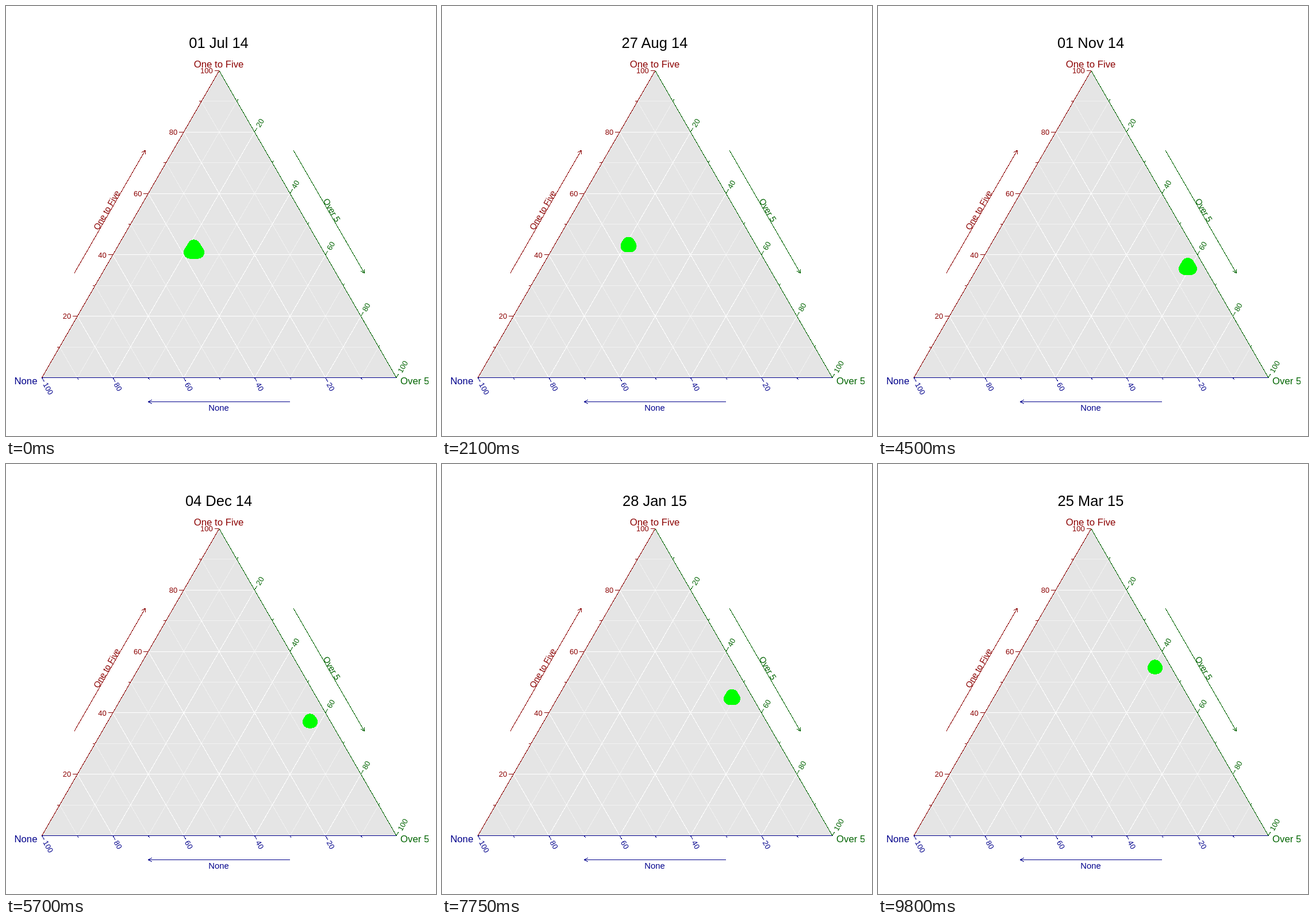
Write an HTML page that moves like this. It is 748 by 748 pixels and loops after 10000 ms.

```html
<!DOCTYPE html>
<html lang="en">
<head>
<meta charset="utf-8">
<title>Ternary plot over time</title>
<style>
html, body { margin: 0; width: 100%; height: 100%; overflow: hidden; background: #fff; }
svg { display: block; font-family: "Liberation Sans", Arial, sans-serif; }
path { shape-rendering: crispEdges; fill: none; stroke-width: 1; }
text { text-anchor: middle; }
#field { fill: #e5e5e5; }
#blob { fill: #0f0; stroke: #0f0; stroke-width: 22; stroke-linejoin: round; }
</style>
</head>
<body>
<svg width="748" height="748" viewBox="0 0 748 748">
  <defs><clipPath id="page"><rect width="735" height="748"/></clipPath></defs>
  <g clip-path="url(#page)">
    <path id="field"/>
    <g id="grid"></g>
    <path id="blob"/>
    <g id="axes"></g>
    <text id="date" x="370" y="73" font-size="25.5"></text>
  </g>
</svg>
<script>
const $ = id => document.getElementById(id);
const RED = '#8b0000', GREEN = '#006400', BLUE = '#00008b';
const rad = deg => deg * Math.PI / 180;
const mix = (a, b, k) => a.map((v, i) => v + (b[i] - v) * k);
const polar = ([x, y], deg, r) => [x + r * Math.cos(rad(deg)), y + r * Math.sin(rad(deg))];

// Equilateral plot area
const SIDE = 616.6;
const LEFT = [62.5, 646.5], RIGHT = polar(LEFT, 0, SIDE), TOP = polar(LEFT, -60, SIDE);
$('field').setAttribute('d', `M${TOP}L${RIGHT}L${LEFT}Z`);

function add(parent, tag, attrs, content = '') {
  const el = document.createElementNS('http://www.w3.org/2000/svg', tag);
  for (const k in attrs) el.setAttribute(k, attrs[k]);
  el.textContent = content;
  $(parent).appendChild(el);
}
function line(parent, a, b, stroke) {
  add(parent, 'path', { d: `M${a}L${b}`, stroke });
}
function label(content, [x, y], size, fill, turn = 0, anchor = 'middle') {
  add('axes', 'text', {
    transform: `translate(${x} ${y}) rotate(${turn})`, dy: '.36em',
    'font-size': size, fill, style: `text-anchor:${anchor}`
  }, content);
}
function arrow(from, dir, color) {
  const tip = polar(from, dir, SIDE * 0.4);
  line('axes', from, tip, color);
  for (const side of [-30, 30]) line('axes', tip, polar(tip, dir + 180 + side, 7), color);
}

// Grid: fine lines first, main lines over them
for (const [start, color] of [[1, '#f1f1f1'], [2, '#fff']]) {
  for (let i = start; i < 10; i += 2) {
    const k = i / 10;
    line('grid', mix(LEFT, TOP, k), mix(RIGHT, TOP, k), color);
    line('grid', mix(LEFT, RIGHT, k), mix(TOP, RIGHT, k), color);
    line('grid', mix(RIGHT, LEFT, k), mix(TOP, LEFT, k), color);
  }
}

// Axes with ticks pointing along their own grid direction
function axis(from, to, color, dir) {
  line('axes', from, to, color);
  for (let i = 1; i <= 10; i++) {
    const p = mix(from, to, i / 10), major = i % 2 === 0;
    line('axes', p, polar(p, dir, major ? 8 : 4), color);
    if (!major) continue;
    const flat = dir === 180;
    label(i * 10, polar(p, dir, 11), 13, color, flat ? 0 : dir, flat ? 'end' : 'start');
  }
}
axis(LEFT, TOP, RED, 180);
axis(TOP, RIGHT, GREEN, -60);
axis(RIGHT, LEFT, BLUE, 60);

arrow([119, 464.5], -60, RED);
arrow([500, 251], 60, GREEN);
arrow([494, 688.5], 180, BLUE);
label('One to Five', [175, 355], 14.8, RED, -60);
label('Over 5', [567, 355], 14.8, GREEN, 60);
label('None', [370, 699], 14.8, BLUE);
label('One to Five', [370, 101], 16.8, RED);
label('None', [54.5, 651.5], 16.8, BLUE, 0, 'end');
label('Over 5', [686, 651.5], 16.8, GREEN, 0, 'start');

// Turning points of the path: step, centre x, centre y, spread
const TURNS = [
  [0, 327, 423, 7],
  [12, 304, 444, 5],
  [30, 280, 420, 5],
  [42, 324.5, 415, 3],
  [71, 447.5, 328, 9],
  [90, 539, 453, 5],
  [98, 552, 474, 5],
  [114, 529, 447, 2],
  [124, 511, 443, 2],
  [155, 504.5, 405.5, 3.5],
  [180, 506, 402, 3],
  [196, 482, 353, 2]
];
const LAST = 196, STEP_MS = 50, LOOP_MS = 10000;
const DAYS_PER_STEP = 1.3643;
// Spans without data, when the previous picture stays
const GAPS = [[13, 14], [20, 23], [43, 45], [125, 138]];

function hold(step) {
  const gap = GAPS.find(([a, b]) => step >= a && step <= b);
  return gap ? gap[0] - 1 : Math.min(step, LAST);
}
function pose(step) {
  const i = Math.max(1, TURNS.findIndex(k => k[0] >= step));
  const a = TURNS[i - 1], b = TURNS[i];
  return mix(a, b, (step - a[0]) / (b[0] - a[0]));
}
function dateText(step) {
  const d = new Date(Date.UTC(2014, 6, 1 + Math.round(step * DAYS_PER_STEP)));
  const month = d.toLocaleString('en-US', { month: 'short', timeZone: 'UTC' });
  return `${String(d.getUTCDate()).padStart(2, '0')} ${month} ${d.getUTCFullYear() % 100}`;
}

let shown = -1;
function draw(step) {
  if (step === shown) return;
  shown = step;
  const [, x, y, s] = pose(step);
  const h = s * 0.8;
  $('blob').setAttribute('d', `M${x} ${y - h}L${x + s} ${y + h}L${x - s} ${y + h}Z`);
  $('date').textContent = dateText(step);
}

const begin = performance.now();
function tick() {
  const t = (performance.now() - begin) % LOOP_MS;
  draw(hold(Math.floor(t / STEP_MS)));
  requestAnimationFrame(tick);
}
draw(0);
requestAnimationFrame(tick);
</script>
</body>
</html>
```
